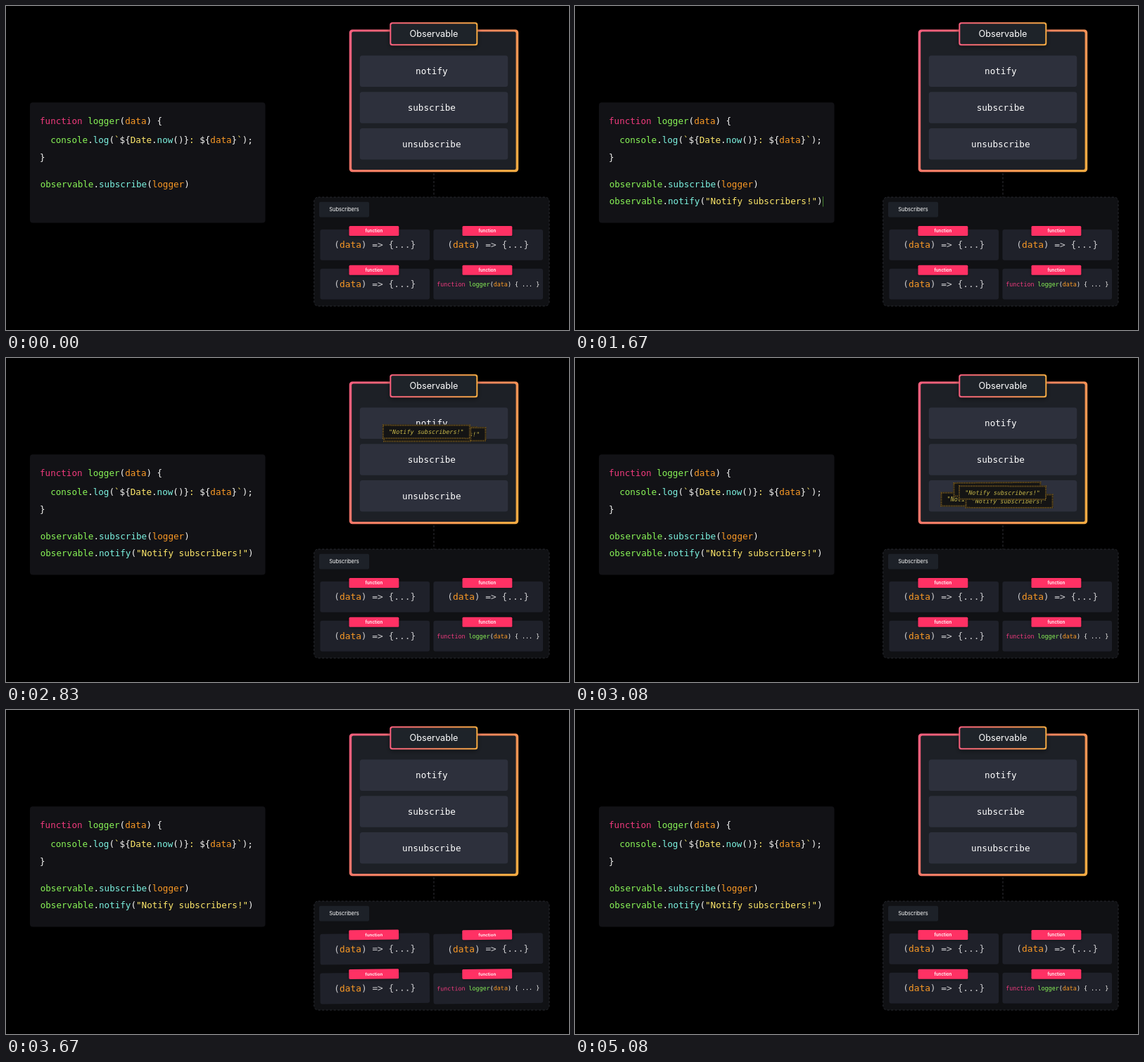
Animation of 800 by 461 pixels, one loop 5260 ms. Source, as an HTML page with a canvas:

```html
<!DOCTYPE html>
<html lang="en">
<head>
<meta charset="utf-8">
<title>Observable notify</title>
<style>
  html, body { margin: 0; width: 100%; height: 100%; overflow: hidden; background: #000; }
  canvas { display: block; width: 800px; height: 461px; }
</style>
</head>
<body>
<canvas id="stage"></canvas>
<script>
const W = 800, H = 461, LOOP = 5260, FPS = 12;
const canvas = document.getElementById('stage');
const ctx = canvas.getContext('2d');
const ratio = window.devicePixelRatio || 1;
canvas.width = W * ratio;
canvas.height = H * ratio;

const MONO = '"DejaVu Sans Mono", monospace';
const SANS = 'Inter, sans-serif';
const PINK = '#f03a7d', GREEN = '#89f457', ORANGE = '#fb9a25',
      CYAN = '#7df3e1', YELLOW = '#ffe96b', WHITE = '#f6f6f4', GREY = '#c9c9cc';

const TYPE_START = 100, TYPE_END = 1600, CURSOR_END = 1750;
const SEND_START = 2670, SEND_END = 3660;

const code = [
  [48, 168.3, [['function', PINK], [' logger', GREEN], ['(', WHITE], ['data', ORANGE], [') {', WHITE]]],
  [48, 194.7, [['  console', GREEN], ['.', WHITE], ['log', CYAN], ['(', WHITE], ['`', YELLOW], ['${', WHITE],
    ['Date', YELLOW], ['.', WHITE], ['now', CYAN], ['()}', WHITE], [': ', YELLOW], ['${', WHITE],
    ['data', ORANGE], ['}', WHITE], ['`', YELLOW], [');', WHITE]]],
  [48, 220.3, [['}', WHITE]]],
  [48.7, 257.9, [['observable', GREEN], ['.', WHITE], ['subscribe', CYAN], ['(', WHITE], ['logger', ORANGE], [')', WHITE]]]
];
const typedLine = [['observable', GREEN], ['.', WHITE], ['notify', CYAN], ['(', WHITE],
  ['"Notify subscribers!"', YELLOW], [')', WHITE]];
const typedLength = typedLine.reduce((n, [s]) => n + s.length, 0);

const arrow = [['(', GREY], ['data', ORANGE], [') => {...}', GREY]];
const named = [['function', PINK], [' logger', GREEN], ['(', WHITE], ['data', ORANGE], [') { ... }', WHITE]];
const cards = [
  { x: 524.2, y: 340, text: arrow, size: 12.85 },
  { x: 685.2, y: 340, text: arrow, size: 12.85 },
  { x: 524.2, y: 395.8, text: arrow, size: 12.85 },
  { x: 685.2, y: 395.8, text: named, size: 8.37 }
];

// Waypoints of each message, back to front.
const stops = [SEND_START, 3083, 3417, SEND_END];
const messages = [
  { x: [608, 582, 538, 524], y: [93, 201, 352, 396], tilt: 0 },
  { x: [608, 600, 546.5, 524], y: [93, 186.5, 307.5, 340], tilt: -1.3 },
  { x: [608, 617, 664.5, 685], y: [93, 203.5, 354, 396], tilt: 0.2 },
  { x: [608, 607.5, 650, 685], y: [93, 191.5, 323, 340], tilt: 0.5 }
];

function box(x, y, w, h, r, fill) {
  ctx.beginPath();
  ctx.roundRect(x, y, w, h, r);
  ctx.fillStyle = fill;
  ctx.fill();
}

function label(text, x, y, font, color, align = 'center') {
  ctx.font = font;
  ctx.textAlign = align;
  ctx.fillStyle = color;
  ctx.fillText(text, x, y);
}

function segments(list, x, y, size, limit = Infinity) {
  ctx.font = `${size}px ${MONO}`;
  for (const [text, color] of list) {
    const part = text.slice(0, Math.max(0, limit));
    label(part, x, y, ctx.font, color, 'left');
    x += ctx.measureText(part).width;
    limit -= text.length;
  }
  return x;
}

function turned(x, y, degrees, draw) {
  ctx.save();
  ctx.translate(x, y);
  ctx.rotate(degrees * Math.PI / 180);
  draw();
  ctx.restore();
}

function wobble(t, start, end, amplitude) {
  if (t < start || t >= end) return 0;
  return amplitude * Math.sin(3 * Math.PI * (t - start) / (end - start));
}

// Smooth cubic through four waypoints.
function through(values, t) {
  return values.reduce((sum, v, i) => sum + stops.reduce(
    (w, s, j) => j === i ? w : w * (t - s) / (stops[i] - s), v), 0);
}

function drawCode(t) {
  box(34, 137.3, 334.5, 171.3, 4, '#121216');
  for (const [x, y, list] of code) segments(list, x, y, 12.58);
  const progress = (t - TYPE_START) / (TYPE_END - TYPE_START);
  const count = Math.floor(typedLength * Math.max(0, Math.min(1, progress)));
  const end = segments(typedLine, 48.7, 282.4, 12.58, count);
  if (t >= TYPE_START && t < CURSOR_END) {
    ctx.fillStyle = '#4c8f35';
    ctx.fillRect(end + 0.4, 271, 0.9, 14.5);
  }
}

function drawObservable(t) {
  const rim = ctx.createLinearGradient(488, 60, 728, 210);
  rim.addColorStop(0, '#f85f7d');
  rim.addColorStop(1, '#f5aa43');
  box(487.7, 33.5, 240.5, 202.8, 4.5, rim);
  box(491.2, 36.6, 233.4, 196.4, 2.5, '#1d2026');

  const titleRim = ctx.createLinearGradient(545, 0, 670, 0);
  titleRim.addColorStop(0, '#f85f7d');
  titleRim.addColorStop(1, '#f5aa43');
  ctx.save();
  ctx.shadowColor = 'rgba(0,0,0,0.45)';
  ctx.shadowBlur = 6 * ratio;
  ctx.shadowOffsetY = 2 * ratio;
  box(545.3, 23.2, 125, 33, 3.5, titleRim);
  ctx.restore();
  box(547.3, 25.2, 121, 29, 2, '#1e2329');
  label('Observable', 608, 44.4, `12.7px ${SANS}`, '#fff');

  const tilt = wobble(t, 1920, 2400, 2.25);
  ['notify', 'subscribe', 'unsubscribe'].forEach((name, i) => {
    turned(608, 92.7 + i * 51.8, i ? 0 : tilt, () => {
      box(-105.2, -22.2, 210.4, 44.4, 3.5, '#2d303c');
      label(name, -3.2, 4.3, `12.6px ${MONO}`, '#fff');
    });
  });
}

function drawCard({ x, y, text, size }, tilt) {
  turned(x, y, tilt, () => {
    box(-77.8, -22, 155.6, 43.8, 3, '#1f212a');
    ctx.font = `${size}px ${MONO}`;
    const width = ctx.measureText(text.map(part => part[0]).join('')).width;
    segments(text, -width / 2, size > 10 ? 4.3 : 2.9, size);
    ctx.save();
    ctx.shadowColor = 'rgba(0,0,0,0.4)';
    ctx.shadowBlur = 4 * ratio;
    ctx.shadowOffsetY = ratio;
    box(-36.7, -27.1, 70.8, 14, 1.5, '#ff3164');
    ctx.restore();
    label('function', -1.3, -17.8, `600 6.2px ${SANS}`, '#fff');
  });
}

function drawSubscribers(t) {
  ctx.lineWidth = 1;
  ctx.strokeStyle = '#303136';
  ctx.setLineDash([3, 2.5]);
  ctx.beginPath();
  ctx.moveTo(608, 238);
  ctx.lineTo(608, 272);
  ctx.stroke();
  box(437.7, 272, 334.3, 155, 6, '#101114');
  ctx.strokeStyle = '#292b30';
  ctx.stroke();
  ctx.setLineDash([]);
  box(445, 278.7, 71, 21.8, 2, '#1d2128');
  label('Subscribers', 480.5, 292.2, `7.5px ${SANS}`, '#fff');
  const tilt = wobble(t, SEND_END, 4080, -4.1);
  for (const card of cards) drawCard(card, tilt);
}

function drawMessages(t) {
  if (t < SEND_START || t >= SEND_END) return;
  const travel = (t - SEND_START) / (SEND_END - SEND_START);
  ctx.save();
  ctx.globalAlpha = Math.min(1, (t - SEND_START) / 150);
  for (const { x, y, tilt } of messages) {
    turned(through(x, t), through(y, t), tilt * travel, () => {
      box(-62.5, -10.3, 125, 20.6, 1, '#141414');
      ctx.lineWidth = 2;
      ctx.strokeStyle = '#80601f';
      ctx.setLineDash([1.2, 1.2]);
      ctx.strokeRect(-61.5, -9.3, 123, 18.6);
      ctx.setLineDash([]);
      label('"Notify subscribers!"', 0, 3, `italic 8.45px ${MONO}`, '#c9b94a');
    });
  }
  ctx.restore();
}

function draw(t) {
  ctx.setTransform(ratio, 0, 0, ratio, 0, 0);
  ctx.fillStyle = '#000';
  ctx.fillRect(0, 0, W, H);
  drawCode(t);
  drawObservable(t);
  drawSubscribers(t);
  drawMessages(t);
}

function frame(now) {
  const step = Math.floor((now % LOOP + 4) * FPS / 1000);
  draw(step * 1000 / FPS);
  requestAnimationFrame(frame);
}

draw(0);
requestAnimationFrame(frame);
</script>
</body>
</html>
```
